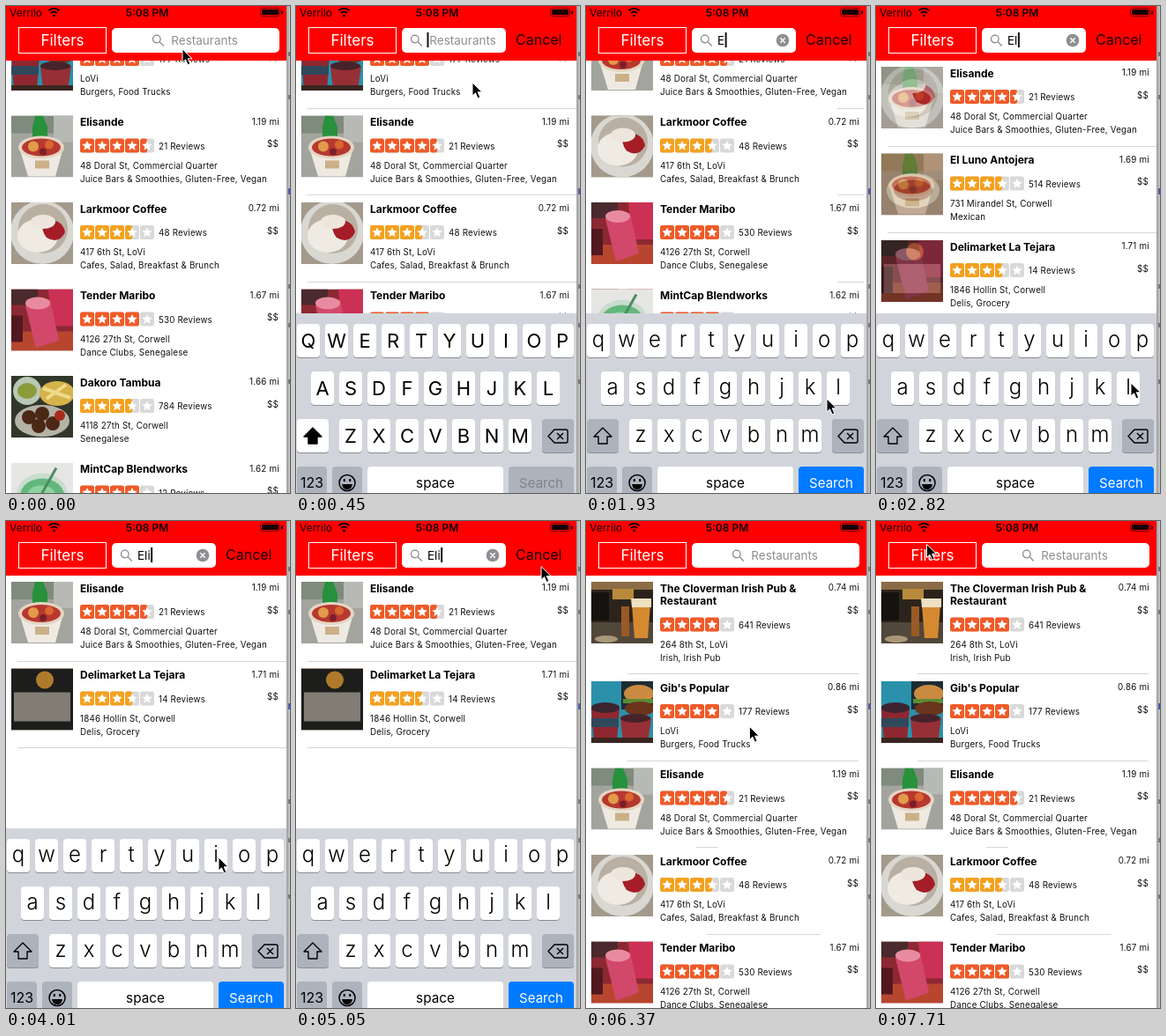
An HTML page for the animation above (8 s loop, 322 by 553 pixels).

```html
<!DOCTYPE html>
<html lang="en">
<head>
<meta charset="utf-8">
<title>Restaurant search</title>
<style>
html, body { margin: 0; width: 100%; height: 100%; overflow: hidden; background: #fff; }
svg { display: block; width: 100vw; height: 100vh; }
text { font-family: Inter, Roboto, sans-serif; white-space: pre; }
.small { font-size: 9.8px; letter-spacing: .17px; fill: #111; }
.title { font-size: 12px; font-weight: 700; fill: #000; }
.end { text-anchor: end; }
.mid { text-anchor: middle; }
</style>
</head>
<body>
<svg viewBox="0 0 322 553" preserveAspectRatio="none">
  <defs>
    <clipPath id="phone"><rect width="318" height="553"/></clipPath>
    <clipPath id="bar"><rect width="310" height="61"/></clipPath>
    <linearGradient id="shade"><stop stop-color="#9a9a9a"/><stop offset="1" stop-color="#cacaca"/></linearGradient>
    <path id="star" d="M8 2.4 9.7 6.1 13.7 6.5 10.7 9.2 11.6 13.2 8 11.1 4.4 13.2 5.3 9.2 2.3 6.5 6.3 6.1Z" fill="#fff"/>
    <symbol id="t-pub" viewBox="0 0 70 70">
      <rect width="70" height="70" fill="#2c241c"/><path d="M0 0h70v9H0z" fill="#8b6c45"/>
      <rect x="24" y="8" width="24" height="12" fill="#b98a3c"/><rect x="0" y="12" width="20" height="32" fill="#15130f"/>
      <path d="M0 46h70v24H0z" fill="#51473a"/><path d="M46 26h21l-3 38H49z" fill="#d58a32"/>
      <path d="M45 19h23v10H46z" fill="#efe0c2"/><rect x="34" y="28" width="9" height="34" fill="#9a5a26"/>
      <ellipse cx="17" cy="65" rx="13" ry="4" fill="#a89878"/>
    </symbol>
    <symbol id="t-diner" viewBox="0 0 70 70">
      <rect width="70" height="70" fill="#2b91ab"/><path d="M34 0h36v32H34z" fill="#1d2b33"/>
      <ellipse cx="54" cy="14" rx="17" ry="10" fill="#cb8a42"/><path d="M36 20h34v5H36z" fill="#5d8b34"/>
      <ellipse cx="55" cy="31" rx="17" ry="8" fill="#6b341d"/>
      <path d="M0 30h32l-3 40H3z" fill="#8f2730"/><ellipse cx="16" cy="30" rx="16" ry="6" fill="#3c2430"/>
      <path d="M0 42h31v10H0z" fill="#30485c"/>
      <path d="M33 42h35l-4 28H36z" fill="#963036"/><ellipse cx="50" cy="42" rx="17" ry="5" fill="#47222b"/>
      <path d="M0 64h70v6H0z" fill="#3a2620"/>
    </symbol>
    <symbol id="t-juice" viewBox="0 0 70 70">
      <rect width="70" height="70" fill="#a3a49e"/><path d="M0 0h70v20H0z" fill="#7f8b7c"/>
      <path d="M48 0h22v30H48z" fill="#b7b9b5"/><path d="M27 0h9l5 13v18H24V13z" fill="#27913c"/>
      <path d="M9 36h50l-9 33H19z" fill="#eeeae2"/><ellipse cx="34" cy="36" rx="26" ry="13" fill="#e4d5c2"/>
      <ellipse cx="34" cy="36" rx="22" ry="10" fill="#b7382f"/><circle cx="25" cy="35" r="6" fill="#e39a4a"/>
      <circle cx="43" cy="33" r="5" fill="#d9672f"/><circle cx="36" cy="41" r="4" fill="#7b1f2b"/>
      <path d="M27 51h16v9H27z" fill="#cbb087"/>
    </symbol>
    <symbol id="t-cafe" viewBox="0 0 70 70">
      <rect width="70" height="70" fill="#a39a8c"/><circle cx="35" cy="34" r="36" fill="#d9d7d1"/>
      <circle cx="36" cy="30" r="28" fill="#b9b0a3"/><ellipse cx="30" cy="38" rx="23" ry="19" fill="#efebe3"/>
      <path d="M36 21q22-4 25 13-7 14-21 6-7-9-4-19z" fill="#a51d27"/>
      <ellipse cx="36" cy="22" rx="14" ry="8" fill="#eee6dc"/>
    </symbol>
    <symbol id="t-club" viewBox="0 0 70 70">
      <rect width="70" height="70" fill="#8c2831"/><path d="M0 0h30v18H0z" fill="#4a2a2c"/>
      <path d="M0 48h70v22H0z" fill="#b8462f"/><path d="M42 0h28v42H46z" fill="#cb3155"/>
      <path d="M16 19 44 12 54 58 28 67z" fill="#d2486b"/><ellipse cx="30" cy="16" rx="14" ry="7" fill="#e98ba0"/>
      <path d="M0 30h13v30H0z" fill="#53181f"/>
    </symbol>
    <symbol id="t-stew" viewBox="0 0 70 70">
      <rect width="70" height="70" fill="#31382b"/><circle cx="18" cy="17" r="16" fill="#b9c7b5"/>
      <ellipse cx="18" cy="17" rx="11" ry="9" fill="#8c9b3a"/><ellipse cx="52" cy="20" rx="20" ry="14" fill="#d5b24a"/>
      <path d="M36 14 67 25M40 26 62 10" stroke="#efd98a" stroke-width="4"/>
      <ellipse cx="35" cy="51" rx="31" ry="18" fill="#b4b3a6"/>
      <g fill="#4b2716"><circle cx="20" cy="47" r="8"/><circle cx="35" cy="43" r="8"/><circle cx="31" cy="57" r="8"/><circle cx="47" cy="54" r="8"/></g>
      <circle cx="55" cy="45" r="6" fill="#a82b20"/>
    </symbol>
    <symbol id="t-shake" viewBox="0 0 70 70">
      <rect width="70" height="70" fill="#e6e6e4"/><path d="M9 32h54l-9 38H18z" fill="#d3ead7"/>
      <ellipse cx="35" cy="37" rx="29" ry="25" fill="#c9dccd"/><ellipse cx="35" cy="38" rx="25" ry="20" fill="#62b87c"/>
      <ellipse cx="34" cy="37" rx="16" ry="11" fill="#8fd2a2"/><path d="m33 38 18-32" stroke="#4b8d5f" stroke-width="3"/>
    </symbol>
    <symbol id="t-cantina" viewBox="0 0 70 70">
      <rect width="70" height="70" fill="#8a5a36"/><path d="M0 0h70v20H0z" fill="#a9652f"/>
      <ellipse cx="36" cy="42" rx="30" ry="20" fill="#d3b994"/><ellipse cx="36" cy="42" rx="22" ry="12" fill="#8e4b2a"/>
    </symbol>
    <symbol id="t-deli" viewBox="0 0 70 70">
      <rect width="70" height="70" fill="#1d1e1c"/><circle cx="38" cy="13" r="10" fill="#b07a2d"/>
      <rect x="3" y="27" width="64" height="33" fill="#817d75"/>
    </symbol>
  </defs>
  <rect width="322" height="553" fill="#fff"/>
  <g id="desk"></g>
  <g clip-path="url(#phone)">
    <rect width="318" height="553" fill="#fff"/>
    <g id="lists"></g>
    <rect width="318" height="62" fill="#fe0000"/>
    <g fill="#140000">
      <text x="4" y="12" font-size="12">Verrilo</text>
      <text x="160" y="12" class="mid" font-size="12" font-weight="600">5:08 PM</text>
      <rect x="288.500" y="2.500" width="22" height="9" rx="2" fill="none" stroke="#700000"/>
      <rect x="290" y="4" width="19" height="6" rx="1"/><rect x="312" y="5.500" width="2" height="4" rx="1"/>
      <circle cx="54.500" cy="11" r="1.500"/>
    </g>
    <path d="M48.500 5.200q6-5 12 0M51 8q3.500-3 7 0" fill="none" stroke="#140000" stroke-width="2"/>
    <rect x="14.500" y="24.500" width="99" height="29" fill="none" stroke="#fff"/>
    <text x="64" y="45" class="mid" font-size="17" fill="#fff">Filters</text>
    <rect id="field" x="120" y="25" height="28" rx="5" fill="#fff"/>
    <g id="lens" fill="none" stroke="#85858a" stroke-width="1.200"><circle cx="4.800" cy="37.500" r="4.300"/><path d="m8 40.700 4.800 4.800"/></g>
    <text id="hint" y="44" font-size="13.500" fill="#8e8e93">Restaurants</text>
    <text id="query" x="149" y="44" font-size="13.500"></text>
    <rect id="caret" y="30" width="2" height="17" fill="#111"/>
    <g id="clear"><circle cx="223" cy="39" r="7.300" fill="#8e8e93"/><path d="m220.300 36.300 5.400 5.400m0-5.400-5.400 5.400" stroke="#fff" stroke-width="1.400"/></g>
    <g clip-path="url(#bar)"><text id="cancel" y="44" font-size="16" fill="#180000">Cancel</text></g>
    <g id="keys"><rect y="349" width="318" height="220" fill="#d1d5db"/></g>
    <path id="pointer" d="M0 0v15l3.500-3.200 2.600 6 2.700-1.200-2.600-5.800H11z" fill="#000" stroke="#fff"/>
  </g>
</svg>
<script>
const $ = id => document.getElementById(id);
const NS = 'http://www.w3.org/2000/svg';

function add(parent, tag, attrs = {}, content) {
  const el = document.createElementNS(NS, tag);
  for (const k in attrs) el.setAttribute(k, attrs[k]);
  if (content !== undefined) el.textContent = content;
  return parent.appendChild(el);
}
const set = (id, attrs) => { for (const k in attrs) $(id).setAttribute(k, attrs[k]); };
const show = (el, on) => el.setAttribute('display', on ? 'inline' : 'none');

// title lines, reviews, rating, miles, address, categories
const PLACES = {
  pub: [['The Cloverman Irish Pub &', 'Restaurant'], 641, 4, '0.74', '264 8th St, LoVi', 'Irish, Irish Pub'],
  diner: [["Gib's Popular"], 177, 4, '0.86', 'LoVi', 'Burgers, Food Trucks'],
  juice: [['Elisande'], 21, 4.5, '1.19', '48 Doral St, Commercial Quarter', 'Juice Bars & Smoothies, Gluten-Free, Vegan'],
  cafe: [['Larkmoor Coffee'], 48, 3.5, '0.72', '417 6th St, LoVi', 'Cafes, Salad, Breakfast & Brunch'],
  club: [['Tender Maribo'], 530, 4, '1.67', '4126 27th St, Corwell', 'Dance Clubs, Senegalese'],
  stew: [['Dakoro Tambua'], 784, 3.5, '1.66', '4118 27th St, Corwell', 'Senegalese'],
  shake: [['MintCap Blendworks'], 12, 4, '1.62', '', ''],
  cantina: [['El Luno Antojera'], 514, 3.5, '1.69', '731 Mirandel St, Corwell', 'Mexican'],
  deli: [['Delimarket La Tejara'], 14, 3.5, '1.71', '1846 Hollin St, Corwell', 'Delis, Grocery']
};

const ALL = 'pub diner juice cafe club stew shake';
const FULL = Array(7).fill([13, 318]);
const PARTIAL = [[47, 309], [47, 309], [125, 150], [136, 266]];
// old: thumbnails each row fades from
const STATES = [
  { at: 0, rows: ALL, scroll: 156, lines: [], query: '' },
  { at: 140, rows: ALL, scroll: 156, lines: FULL, query: '' },
  { at: 1400, rows: 'pub juice cafe club shake', old: 'pub diner juice cafe club', scroll: 156, lines: Array(5).fill([285, 315]), query: 'E' },
  { at: 2680, rows: 'juice cantina deli', old: 'cafe juice club', scroll: 0, lines: FULL, query: 'El' },
  { at: 3560, rows: 'juice deli', old: 'juice cantina', scroll: 0, lines: FULL, query: 'Eli' },
  { at: 5540, rows: ALL, old: 'juice deli deli shake cantina stew shake', scroll: 0, lines: FULL, query: '' },
  { at: 5900, rows: ALL, scroll: 0, lines: PARTIAL, query: '' }
];

function drawStars(g, rating, y) {
  const color = rating < 4 ? '#f3a11f' : '#ef5a28';
  for (let i = 0; i < 5; i++) {
    const x = 84 + 17 * i, part = Math.max(0, Math.min(1, rating - i));
    add(g, 'rect', { x, y, width: 16, height: 16, rx: 2.5, fill: '#d9d9d9' });
    if (part) add(g, 'rect', { x, y, width: 16 * part, height: 16, rx: 2.5, fill: color });
    add(g, 'use', { href: '#star', x, y });
  }
}

function drawRow(parent, name, old, y) {
  const [title, reviews, rating, miles, address, kinds] = PLACES[name];
  const g = add(parent, 'g', { transform: `translate(0 ${y})` });
  const shift = title.length > 1 ? 14.5 : 0;
  const text = (x, ty, s, cls = 'small') => add(g, 'text', { x, y: ty, class: cls }, s);
  const thumb = id => add(g, 'use', { href: '#t-' + id, x: 6, y: 8, width: 70, height: 70 });
  if (old) thumb(old);
  const fresh = thumb(name);
  title.forEach((s, i) => text(84, 19.5 + 14 * i, s, 'title'));
  drawStars(g, rating, 34 + shift);
  text(173, 46 + shift, reviews + ' Reviews');
  text(84, 68 + shift, address);
  text(84, 83 + shift, kinds);
  text(309.7, 18, miles + ' mi', 'small end');
  text(309, 43.5, '$$', 'small end');
  return { fresh, height: 98.5 + (shift && 14.5) };
}

function buildList(state) {
  state.g = add($('lists'), 'g');
  state.thumbs = [];
  const old = (state.old || '').split(' ');
  let y = 61 - state.scroll;
  state.rows.split(' ').forEach((name, i) => {
    const row = drawRow(state.g, name, old[i], y);
    y += row.height;
    state.thumbs.push(row.fresh);
    const line = state.lines[i];
    if (line) add(state.g, 'rect', { x: line[0], y: Math.round(y - 1), width: line[1] - line[0], height: 1, fill: '#d6d6d8' });
  });
}

function key(x, y, w, fill = '#fff') {
  add($('keys'), 'rect', { x, y: y + 1, width: w, height: 38, rx: 4, fill: '#898c91' });
  return add($('keys'), 'rect', { x, y, width: w, height: 38, rx: 4, fill });
}

const GRAY = '#adb3bd';
const kb = {};
function buildKeys() {
  const root = $('keys');
  const rows = [['qwertyuiop', 14, 361], ['asdfghjkl', 30, 415], ['zxcvbnm', 62, 469]];
  for (const [letters, x0, y] of rows) [...letters].forEach((_, i) => key(x0 + 32 * i - 13, y, 26));
  kb.upper = add(root, 'g', { 'font-size': 22 });
  kb.lower = add(root, 'g', { 'font-size': 24, 'font-weight': 300 });
  for (const [letters, x0, y] of rows) [...letters].forEach((c, i) => {
    const x = x0 + 32 * i;
    add(kb.upper, 'text', { x, y: y + 27, class: 'mid' }, c.toUpperCase());
    add(kb.lower, 'text', { x, y: y + 26, class: 'mid' }, c);
  });
  kb.shift = key(1, 469, 36);
  kb.arrow = add(root, 'path', { d: 'M19 479 29 489H24V497H14V489H9Z', stroke: '#000', 'stroke-width': 1.4, 'stroke-linejoin': 'round' });
  key(279, 469, 36, GRAY);
  add(root, 'path', { d: 'M286 488.5 293 481H306Q308 481 308 483V494Q308 496 306 496H293ZM296 485 303 492M303 485 296 492', fill: 'none', stroke: '#000', 'stroke-width': 1.4 });
  key(1, 523, 34, GRAY);
  key(41, 523, 34, GRAY);
  key(81, 523, 154);
  kb.search = key(241, 523, 74);
  const label = (x, s, size) => add(root, 'text', { x, y: 547, class: 'mid', 'font-size': size }, s);
  label(18, '123', 16);
  label(158, 'space', 15.3);
  kb.searchText = label(278, 'Search', 15);
  add(root, 'circle', { cx: 58, cy: 541.5, r: 9, fill: 'none', stroke: '#000', 'stroke-width': 1.5 });
  add(root, 'path', { d: 'M52 543H64Q63 549 58 549T52 543Z' });
  for (const cx of [54.8, 61.2]) add(root, 'ellipse', { cx, cy: 538.5, rx: 1.2, ry: 1.8 });
}

function buildDesk() {
  const g = $('desk');
  add(g, 'rect', { x: 318, width: 4, height: 553, fill: 'url(#shade)' });
  for (const y of [52, 101, 316, 360, 424]) add(g, 'rect', { x: 320, y, width: 2, height: 5, fill: '#777' });
  add(g, 'rect', { x: 320, y: 207, width: 2, height: 7, fill: '#4a5ab0' });
}

// Tracks: [step, values...], linear in between
const STEP = 148.2;
const KEYS_DROP = [[0, 216], [1, 140], [2, 20], [3, 0], [37, 0], [38, 143], [39, 216]];
const FIELD = [[0, 190], [1, 158], [2, 121], [3, 118], [37, 118], [38, 143], [39, 183], [40, 190]];
const POINTER = [
  [0, 200, 49], [3, 200, 87], [7, 82, 375], [10, 80, 378], [13, 273, 446], [15, 289, 428], [20, 289, 428],
  [23, 241, 382], [27, 241, 382], [31, 268, 122], [33, 286, 62], [36, 262, 31], [38, 262, 31],
  [41, 215, 170], [44, 126, 360], [45, 137, 386], [46, 254, 533], [47, 300, 600], [48, 300, 600],
  [49, 126, 248], [50, 98, 130], [51, 66, 50], [52, 57.5, 26.5]
];

function sample(track, n) {
  const i = track.findIndex(k => k[0] >= n);
  if (i < 0) return track[track.length - 1].slice(1);
  if (!i) return track[0].slice(1);
  const a = track[i - 1], b = track[i], p = (n - a[0]) / (b[0] - a[0]);
  return a.slice(1).map((v, j) => v + (b[j + 1] - v) * p);
}

function drawList(t) {
  const state = STATES.filter(s => s.at <= t).pop();
  for (const s of STATES) show(s.g, s === state);
  const fade = state.old ? Math.min(1, (t - state.at) / 300) : 1;
  for (const el of state.thumbs) el.setAttribute('opacity', fade);
  return state;
}

function drawBar(n, t, state) {
  const [w] = sample(FIELD, n), open = (190 - w) / 72, typed = state.query !== '';
  const lensX = 120 + (w - 97) / 2;
  set('field', { width: w });
  set('lens', { transform: `translate(${lensX - .5} 0)` });
  set('hint', { x: lensX + 20.8 });
  set('cancel', { x: 131 + w, opacity: open * open });
  show($('hint'), !typed);
  show($('clear'), typed);
  $('query').textContent = state.query;
  const len = typed ? $('query').getComputedTextLength() : -1;
  set('caret', { x: 149.5 + len });
  show($('caret'), n >= 2 && n < 38 && (t - state.at) % 1060 < 640);
}

function drawKeys(n, t, state) {
  const [drop] = sample(KEYS_DROP, n), caps = t < 1400, ready = state.query !== '' || n >= 38;
  set('keys', { transform: `translate(0 ${drop})` });
  show(kb.upper, caps);
  show(kb.lower, !caps);
  kb.shift.setAttribute('fill', caps ? '#fff' : GRAY);
  kb.arrow.setAttribute('fill', caps ? '#000' : 'none');
  kb.search.setAttribute('fill', ready ? '#007aff' : GRAY);
  kb.searchText.setAttribute('fill', ready ? '#fff' : '#7d838b');
}

function draw(now) {
  const n = Math.floor((now % 8000) / STEP), t = n * STEP;
  const state = drawList(t);
  drawBar(n, t, state);
  drawKeys(n, t, state);
  const [x, y] = sample(POINTER, n);
  set('pointer', { transform: `translate(${x} ${y})` });
}

buildDesk();
STATES.forEach(buildList);
buildKeys();
const start = performance.now();
function tick() {
  draw(performance.now() - start);
  requestAnimationFrame(tick);
}
tick();
</script>
</body>
</html>
```
